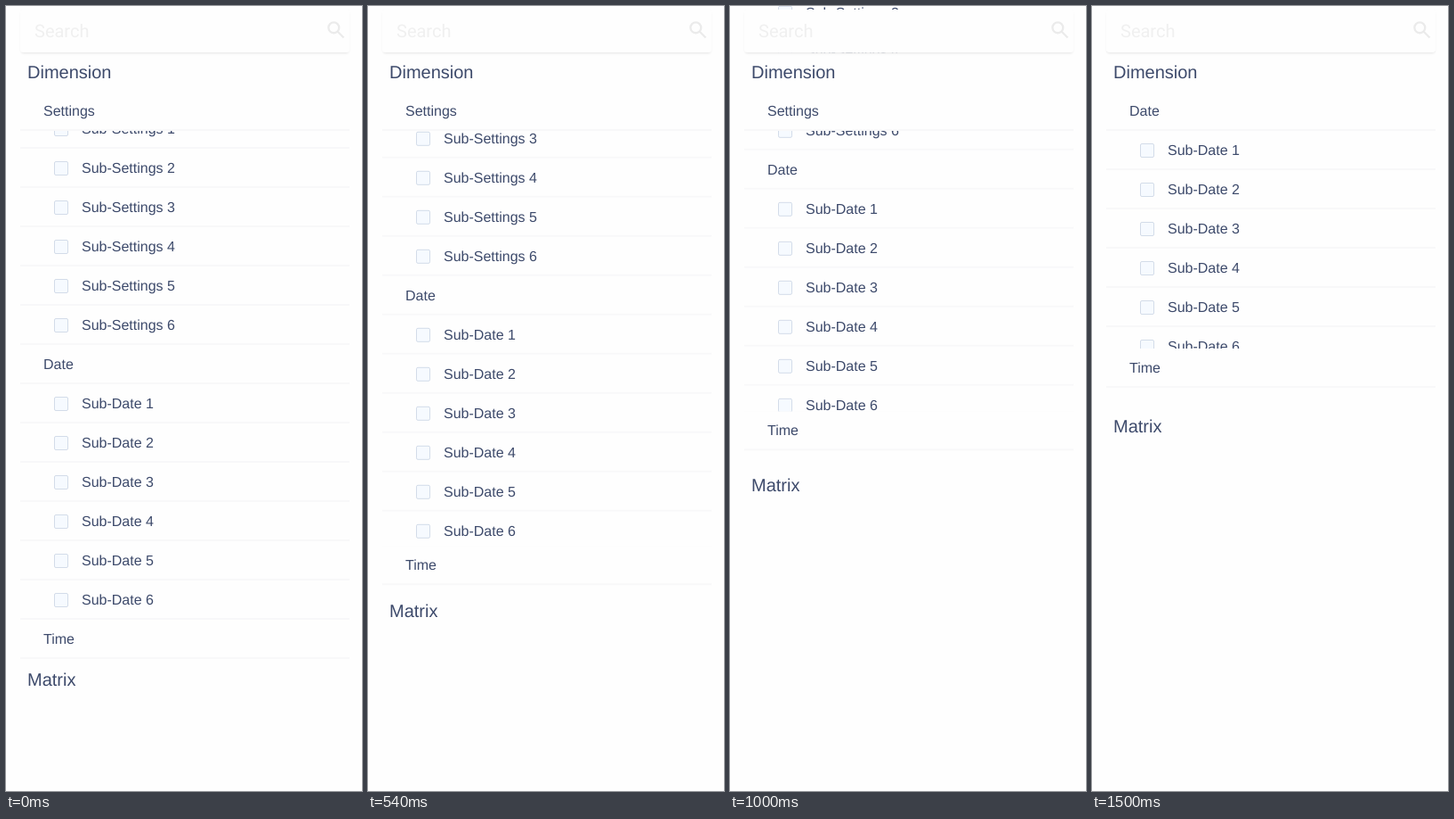
Write an HTML page that moves like this. It is 400 px wide and 880 px high and loops after 2.54 s.

```html
<!DOCTYPE html>
<html lang="en">
<head>
<meta charset="utf-8">
<title>Filter list</title>
<style>
  html, body { margin: 0; width: 100%; height: 100%; overflow: hidden; background: #fefefe; }
  body {
    position: relative;
    color: #3d4a6b;
    font: 16px/44px "Liberation Sans", Arial, sans-serif;
    text-rendering: geometricPrecision;
  }
  div { position: absolute; box-sizing: border-box; white-space: pre; }
  .layer { left: 0; top: 0; width: 400px; height: 0; }
  .row {
    left: 16px; width: 370px; height: 44px;
    padding-top: 1px;
    border-bottom: 2px solid #f8f8f9;
    background: #fefefe;
  }
  .group { padding-left: 26px; }
  .item { padding-left: 69px; }
  .item::before {
    content: "";
    position: absolute;
    left: 38px; top: 14px;
    width: 14px; height: 14px;
    border: 1px solid #d3dce9;
    border-radius: 2px;
    background: #f6faff;
  }
  .title { padding-left: 8px; border: 0; font-size: 20px; }
  /* a hairline above the heading lets passing rows shine through */
  #dimension { background: linear-gradient(#fefefed9 1px, #fefefe 0); }
  #search {
    left: 16px; top: 4px; width: 370px; height: 48px;
    padding-left: 16px;
    border-radius: 3px;
    background: #fefefe;
    box-shadow: 0 2px 3px -1px rgba(0, 0, 0, .1);
    color: #f0f0f0;
    font: 20px/48px Roboto, sans-serif;
  }
  svg { position: absolute; left: 342px; top: 10px; fill: none; stroke: #ebebeb; stroke-width: 2.1; }
</style>
</head>
<body>
<div class="layer" id="settings"></div>
<div class="row title" id="dimension" style="top:52px">Dimension</div>
<div class="row group" style="top:96px">Settings</div>
<div id="search">Search<svg width="26" height="26" viewBox="0 0 24 24"><circle cx="9.5" cy="9.5" r="5.5"/><path d="M13.6 13.6L19.8 19.8"/></svg></div>
<div class="layer" id="date"></div>
<div class="layer" id="time"></div>
<script>
  const LOOP = 2540, FPS = 24, STEPS = 36;
  const SCROLL = 284, TIME_SCROLL = 304;
  const [settings, date, time] = ["settings", "date", "time"].map(id => document.getElementById(id));

  function addRow(layer, kind, top, text) {
    const row = document.createElement("div");
    row.className = "row " + kind;
    row.style.top = top + "px";
    row.textContent = text;
    layer.append(row);
  }

  function addItems(layer, top, name) {
    for (let i = 0; i < 6; i++) addRow(layer, "item", top + 44 * i, `Sub-${name} ${i + 1}`);
  }

  addItems(settings, 116, "Settings");
  addRow(date, "group", 380, "Date");
  addItems(date, 424, "Date");
  addRow(date, "title", 733, "Matrix");
  addRow(time, "group", 688, "Time");

  // cubic-bezier(.42, 0, .58, 1)
  function easeInOut(x) {
    let u = x;
    for (let i = 0; i < 6; i++) {
      const error = ((.52 * u - .78) * u + 1.26) * u - x;
      u -= error / ((1.56 * u - 1.56) * u + 1.26);
    }
    return u * u * (3 - 2 * u);
  }

  const shift = (layer, y) => layer.style.transform = `translateY(${-y}px)`;

  function draw() {
    const t = Math.floor(performance.now() % LOOP / 10) * 10;
    const step = Math.min(STEPS, Math.floor((t + 5) * FPS / 1000));
    const p = easeInOut(step / STEPS);
    shift(settings, SCROLL * p);
    shift(date, SCROLL * p);
    shift(time, TIME_SCROLL * p);
    requestAnimationFrame(draw);
  }
  draw();
</script>
</body>
</html>
```
